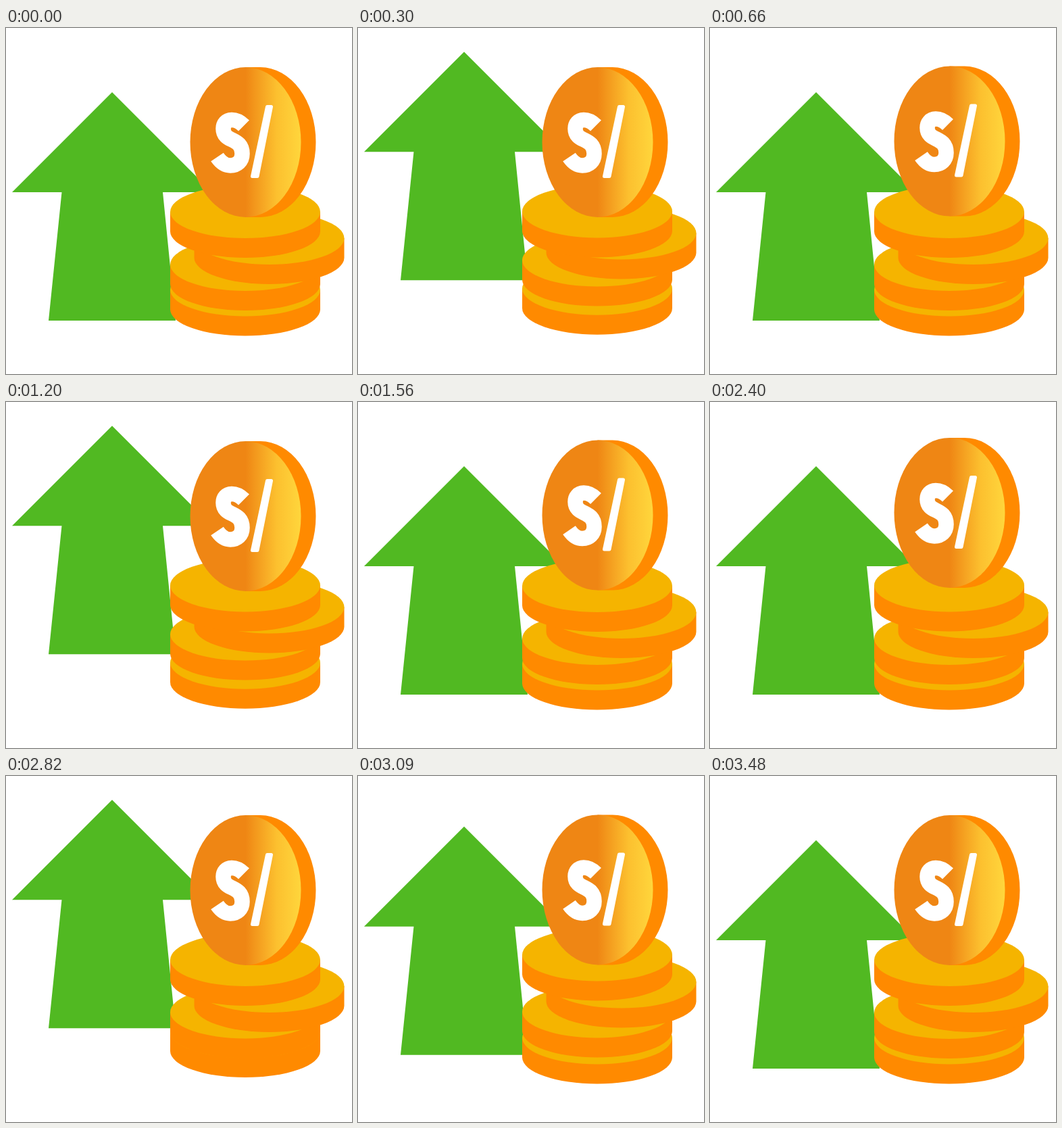
Animation, 512 px wide and 512 px high, one loop 3.6 s. Source, as an HTML page:

```html
<!DOCTYPE html>
<html lang="en">
<head>
<meta charset="utf-8">
<title>Rising coins</title>
<style>
  html, body { margin: 0; height: 100%; overflow: hidden; background: #fff; }
  svg { display: block; width: 100vw; height: 100vh; }
  .rim { fill: #ff8a00; }
  .top { fill: #f5b400; }
</style>
</head>
<body>
<svg viewBox="0 0 512 512">
  <defs>
    <linearGradient id="shine">
      <stop offset=".5" stop-color="#ef8614"/>
      <stop offset=".78" stop-color="#fcc02f"/>
      <stop offset="1" stop-color="#ffd63c"/>
    </linearGradient>
    <g id="coin">
      <path class="rim" d="M-111 0V29A111 39 0 0 0 111 29V0z"/>
      <ellipse class="top" rx="111" ry="39"/>
    </g>
  </defs>
  <path id="arrow" fill="#51b922" d="M157 95 305 243H232L251 433H63L82.5 243H9z"/>
  <g class="coin"><use href="#coin" x="354" y="387.5"/></g>
  <g class="coin"><use href="#coin" x="354" y="350"/></g>
  <g class="coin"><use href="#coin" x="389.5" y="311"/></g>
  <g class="coin"><use href="#coin" x="354" y="272"/></g>
  <g class="coin">
    <path class="rim" d="M354.5 58H376.5A82 111 0 0 1 376.5 280H354.5z"/>
    <ellipse cx="354.5" cy="169" rx="82" ry="111" fill="url(#shine)"/>
    <g role="img" aria-label="S/" stroke="#fff" stroke-linejoin="round">
      <path fill="none" stroke-width="22.5" d="M352 144.5C346 138.5 340 136 334 136C326 136 321.5 142 321.5 149
        C321.5 170 349.5 161 349.5 186C349.5 197 342 203.5 332 203.5C324 203.5 318 199 312.5 191"/>
      <path fill="#fff" stroke-width="5" d="M386.5 116.5H392.5L372 219.5H364.5z"/>
    </g>
  </g>
</svg>
<script>
  const PERIOD = 900, STEP = 30, STAGGER = 90;
  const arrow = document.getElementById('arrow');
  const coins = [...document.querySelectorAll('g.coin')];

  const clamp = x => Math.min(1, Math.max(0, x));
  const ease = x => x < .5 ? 4 * x ** 3 : 1 - 4 * (1 - x) ** 3;

  // Rises until peak, then settles back at end.
  const hop = (t, peak, end) =>
    ease(t < peak ? clamp(t / peak) : clamp((end - t) / (end - peak)));

  const lift = (node, dy) => node.setAttribute('transform', `translate(0 ${-dy})`);

  function draw(now) {
    const t = Math.floor(now / STEP) * STEP % PERIOD;
    lift(arrow, 70 * hop(t, 180, 540));
    coins.forEach((coin, i) => {
      const height = i === 0 ? 9.5 : 7.5;
      lift(coin, height * hop(t - i * STAGGER, 110, 410));
    });
  }

  const start = performance.now();
  function tick() {
    draw(performance.now() - start);
    requestAnimationFrame(tick);
  }
  tick();
</script>
</body>
</html>
```
